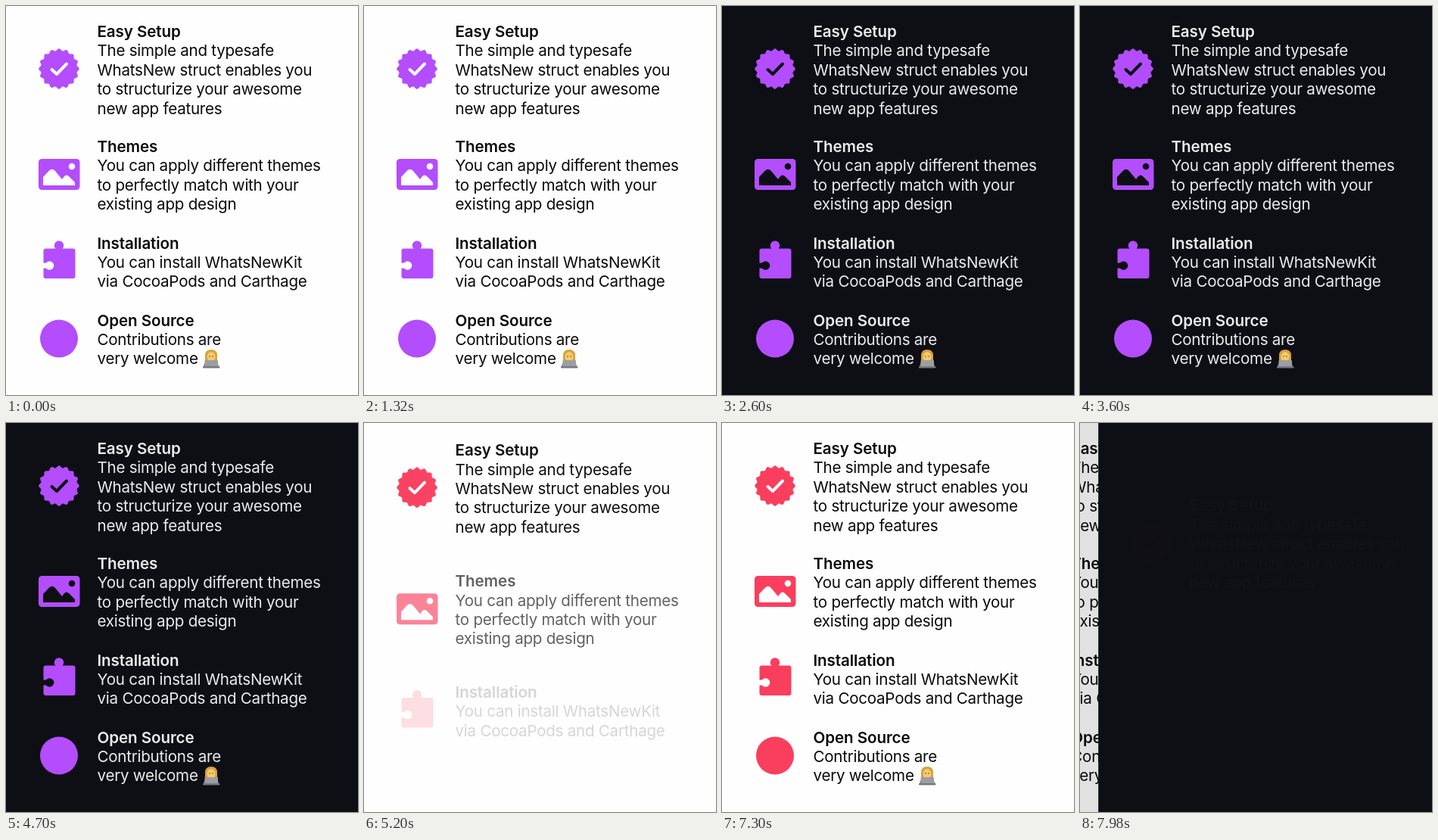
An HTML page for the animation above (8 s loop, 465 by 514 pixels).

```html
<!DOCTYPE html>
<html lang="en">
<head>
<meta charset="utf-8">
<title>Feature list</title>
<style>
  html, body { margin: 0; width: 100%; height: 100%; overflow: hidden; background: #fff; }
  svg { display: block; width: 100vw; height: 100vh; }
  text { font: 400 20.6px Inter, "Open Sans", sans-serif; letter-spacing: -0.26px; fill: var(--ink); }
  .title { font-weight: 600; letter-spacing: -0.1px; }
  .tint { fill: var(--tint); }
  .hole { fill: var(--bg); }
  .line { fill: none; stroke: var(--bg); stroke-width: 4; stroke-linecap: round; stroke-linejoin: round; }
</style>
</head>
<body>
<svg id="stage" viewBox="0 0 465 514"></svg>
<script>
const WIDTH = 465, HEIGHT = 514, LOOP = 8000, LINE = 25.4;

// Push transition and staggered item entrance, all in ms
const SPEED = 1.67;
const PUSH_RATE = 0.01826 * SPEED;
const FIRST_DELAY = 220 / SPEED;
const ITEM_DELAY = 150 / SPEED;
const ITEM_TIME = 500 / SPEED;
const PARALLAX = 0.3, DIM = 0.12;

const LIGHT = { bg: '#fefefe', ink: '#0a0a0a' };
const DARK = { bg: '#0d0f14', ink: '#ebebee' };
const PURPLE = '#b34dfd', PINK = '#fa3e5e';

const pages = [
  { ...LIGHT, tint: PURPLE, start: -5000 },
  { ...DARK, tint: PURPLE, start: 1869 },
  { ...LIGHT, tint: PINK, start: 4806 },
  { ...DARK, tint: PINK, start: 7827 },
];

function sealPath(cx, cy, radius, depth, bumps) {
  const points = Array.from({ length: 192 }, (_, i) => {
    const angle = i / 192 * 2 * Math.PI;
    const r = radius + depth * Math.cos(bumps * angle);
    return `${(cx + r * Math.sin(angle)).toFixed(2)},${(cy - r * Math.cos(angle)).toFixed(2)}`;
  });
  return `M${points.join('L')}Z`;
}

const icons = {
  seal: `<path class="tint" d="${sealPath(70, 83, 25.4, 1.4, 16)}"/>
    <path class="line" d="M60.5 84L67 90L80 76.5"/>`,
  picture: `<rect class="tint" x="43" y="202" width="54.5" height="41" rx="4.5"/>
    <circle class="hole" cx="87" cy="212" r="4.3"/>
    <path class="hole" d="M49 226L57 217.5Q61 214 65 218L74 229L77 225Q80 222 83 225L91 233V237H49Z"/>`,
  puzzle: `<rect class="tint" x="49.5" y="320.5" width="42" height="39.5" rx="3"/>
    <circle class="tint" cx="70" cy="316.5" r="6.2"/>
    <path class="tint" d="M66 318H74V323H66Z"/>
    <circle class="hole" cx="57.5" cy="343" r="5.8"/>
    <path class="hole" d="M49 339.5H56V346.5H49Z"/>`,
  disc: `<circle class="tint" cx="70" cy="439.5" r="25"/>`,
};

const person = `
  <path fill="#d9a03c" d="M263 469V462Q263 454 271 454T279 462V469Z"/>
  <path fill="#6f7a8c" d="M261 478Q261 468 271 468T281 478Z"/>
  <ellipse cx="271" cy="463.5" rx="5.5" ry="6.5" fill="#f4cb6c"/>
  <circle cx="269" cy="463" r=".8" fill="#5b4020"/>
  <circle cx="273" cy="463" r=".8" fill="#5b4020"/>
  <rect x="262.5" y="468" width="17.5" height="9.5" rx="1" fill="#9b9ea3"/>
  <rect x="260" y="476" width="22.5" height="2.5" rx="1" fill="#77797e"/>`;

const items = [
  { y: 41, icon: icons.seal, lines: ['Easy Setup', 'The simple and typesafe',
    'WhatsNew struct enables you', 'to structurize your awesome', 'new app features'] },
  { y: 193, icon: icons.picture, lines: ['Themes', 'You can apply different themes',
    'to perfectly match with your', 'existing app design'] },
  { y: 320.5, icon: icons.puzzle, lines: ['Installation', 'You can install WhatsNewKit',
    'via CocoaPods and Carthage'] },
  { y: 422.5, icon: icons.disc + person, lines: ['Open Source', 'Contributions are', 'very welcome'] },
];

const itemMarkup = ({ y, icon, lines }) => `<g class="item">${icon}${lines.map((line, i) =>
  `<text x="120.5" y="${y + i * LINE}"${i ? '' : ' class="title"'}>${line}</text>`).join('')}</g>`;

const pageMarkup = ({ bg, ink, tint }) => `
  <g class="page" style="--bg:${bg};--ink:${ink};--tint:${tint}">
    <rect class="hole" width="${WIDTH}" height="${HEIGHT}"/>
    ${items.map(itemMarkup).join('')}
    <rect class="dim" width="${WIDTH}" height="${HEIGHT}"/>
  </g>`;

const stage = document.getElementById('stage');
stage.innerHTML = pages.map(pageMarkup).join('');
const views = [...stage.querySelectorAll('.page')].map(node => ({
  node,
  items: [...node.querySelectorAll('.item')],
  dim: node.querySelector('.dim'),
}));

const clamp = v => Math.min(1, Math.max(0, v));

// Critically damped spring
function pushProgress(time) {
  const x = PUSH_RATE * Math.max(0, time);
  return 1 - (1 + x) * Math.exp(-x);
}

// cubic-bezier(.42, 0, .58, 1)
function easeInOut(x) {
  let low = 0, high = 1;
  for (let i = 0; i < 16; i++) {
    const s = (low + high) / 2, r = 1 - s;
    if (1.26 * s * r * r + 1.74 * s * s * r + s * s * s < x) low = s;
    else high = s;
  }
  return low * low * (3 - 2 * low);
}

function render(t) {
  views.forEach((view, p) => {
    const entered = pushProgress(t - pages[p].start);
    const left = p + 1 < pages.length ? pushProgress(t - pages[p + 1].start) : 0;
    const x = WIDTH * (1 - entered - PARALLAX * left);
    view.node.setAttribute('transform', `translate(${x.toFixed(2)} 0)`);
    view.node.setAttribute('visibility', entered > 0 && left < 0.9999 ? 'visible' : 'hidden');
    view.dim.setAttribute('opacity', DIM * left);

    view.items.forEach((node, i) => {
      const elapsed = t - pages[p].start - FIRST_DELAY - ITEM_DELAY * i;
      const shown = elapsed >= ITEM_TIME ? 1 : easeInOut(clamp(elapsed / ITEM_TIME));
      const height = (items[i].lines.length + 1) * LINE;
      node.setAttribute('transform', `translate(0 ${((1 - shown) * height / 2).toFixed(2)})`);
      node.setAttribute('opacity', shown);
    });
  });
}

const origin = performance.now();
function frame() {
  render((performance.now() - origin) % LOOP);
  requestAnimationFrame(frame);
}
frame();
</script>
</body>
</html>
```
